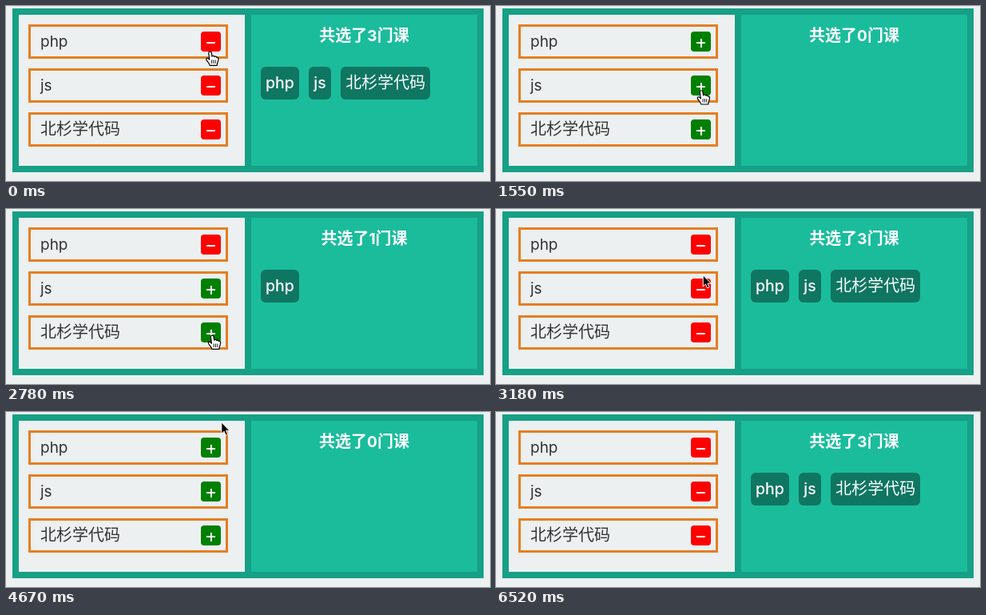
These frames come from a looping animation (606x219 px, 7200 ms). An HTML page:

```html
<!DOCTYPE html>
<html lang="zh-CN">
<head>
<meta charset="utf-8">
<style>
  html, body { margin: 0; width: 100%; height: 100%; overflow: hidden; background: #ecf0f1; }
  body { position: relative; font: 20px/41px Inter, "Noto Sans CJK SC", "Noto Sans CJK", sans-serif; }
  .board { position: absolute; left: 8px; top: 3px; width: 574px; height: 189px; border: 8px solid #16a085; }
  .chosen { position: absolute; left: 283px; width: 283px; height: 189px; border-left: 8px solid #16a085; background: #1abc9c; color: #fff; }
  .title { position: absolute; top: 6px; width: 100%; text-align: center; font-weight: 700; }
  .title span { font-size: 19px; }
  .tags { position: absolute; left: 12px; top: 65px; display: flex; gap: 12.5px; font-weight: 500; }
  .tag { padding: 0 6px; height: 41px; border-radius: 6px; background: #0f7661; white-space: nowrap; }
  .tag.latin { font-size: 19.5px; }
  .row { position: absolute; left: 12px; width: 244px; height: 37px; border: 3px solid #e67e22; color: #333; line-height: 37px; text-indent: 12px; }
  .row.latin { font-size: 19px; }
  .toggle { position: absolute; left: 213px; top: 6px; width: 25px; height: 25px; border-radius: 4px; background: #008000; }
  .toggle::before, .toggle::after { content: ""; position: absolute; background: #fff; }
  .toggle::before { left: 7px; top: 13px; width: 11px; height: 2px; }
  .toggle::after { left: 11.5px; top: 8.5px; width: 2px; height: 11px; }
  .on .toggle { background: #f00; }
  .on .toggle::after { display: none; }
  svg { position: absolute; left: 0; top: 0; width: 606px; height: 219px; }
</style>
</head>
<body>
<div class="board">
  <div class="chosen">
    <div class="title">共选了<span id="count">3</span>门课</div>
    <div class="tags" id="tags"></div>
  </div>
</div>
<svg viewBox="0 0 606 219">
  <g id="cursor">
    <g id="hand" stroke="#000" stroke-width="1.2" stroke-linejoin="round" stroke-linecap="round">
      <path fill="#fff" d="M-2.5 2.6C-2.5 .2 .9 .2 1.2 2.4L1.8 6.8C2.2 5.6 4.7 5.8 5 7.2 5.6 6.4 7.4 6.7 7.7 8.2 8.6 7.6 9.8 8.2 9.8 9.7 9.8 13 8.3 13.8 8 18H-1C-1.2 15.5-4.4 13.2-5.4 10.7-5.8 8.8-4 8.2-2.8 9.4L-1.4 10.8Z"/>
      <path fill="none" stroke-width=".9" d="M1.4 11.5V15.2M3.7 11.5V15.2M6 11.5V15.2"/>
    </g>
    <path id="arrow" stroke="#fff" d="M0 0V14.2L3.3 11.2 5.4 16.2 7.8 15.2 5.7 10.3H10Z"/>
  </g>
</svg>
<script>
const LOOP = 7200, PAUSE = 180, PITCH = 55;
const courses = ["php", "js", "北杉学代码"];

// Pointer stops: [time of leaving, row, sideways shift].
// A stop on a whole row ends with a click that toggles its course.
const stops = [
  [180, .05], [470, 0], [930, 1], [1300, 2], [1730, 1], [2070, 0],
  [2420, 1], [2830, 2], [3130, 1], [3440, 0], [3860, 1.47], [4260, 2],
  [4480, 1], [4840, -.54, 9], [5190, 0], [5710, 1], [6120, 2], [6700, 3.5]
];

const $ = id => document.getElementById(id);
const show = (el, visible) => el.style.display = visible ? "" : "none";
const rowCentre = row => 44.5 + PITCH * row;

function add(parent, className, text) {
  const el = document.createElement("div");
  el.className = className;
  el.textContent = text;
  if (/^\w+$/.test(text)) el.classList.add("latin");
  parent.append(el);
  return el;
}

const rows = courses.map((name, i) => {
  const row = add(document.querySelector(".board"), "row", name);
  row.style.top = 12 + PITCH * i + "px";
  add(row, "toggle", "");
  return row;
});
const tags = courses.map(name => add($("tags"), "tag", name));

// The aim drifts slowly up and to the right over the loop.
const place = ([leave, row, shift = 0]) =>
  [256 + leave / 1000 + shift, rowCentre(row) + 9.5 - leave / 430];

function pointerAt(t) {
  const next = stops.findIndex(([leave]) => t < leave);
  if (next < 1) return place(stops.at(next));
  const from = stops[next - 1], to = stops[next];
  const p = Math.min(1, (t - from[0]) / (to[0] - PAUSE - from[0]));
  const ease = p * p * (3 - 2 * p);
  const [x, y] = place(from), [toX, toY] = place(to);
  return [x + (toX - x) * ease, y + (toY - y) * ease];
}

function draw(t) {
  const picked = courses.map((_, i) =>
    stops.filter(([leave, row]) => row === i && leave <= t).length % 2 === 0);
  picked.forEach((on, i) => {
    rows[i].classList.toggle("on", on);
    show(tags[i], on);
  });
  $("count").textContent = picked.filter(Boolean).length;

  const [x, y] = pointerAt(t);
  const overButton = courses.some((_, i) => Math.abs(y - rowCentre(i)) < 14);
  $("cursor").setAttribute("transform", `translate(${x} ${y})`);
  show($("hand"), overButton);
  show($("arrow"), !overButton);
}

const begin = performance.now();
function tick() {
  draw((performance.now() - begin) % LOOP);
  requestAnimationFrame(tick);
}
tick();
</script>
</body>
</html>
```
